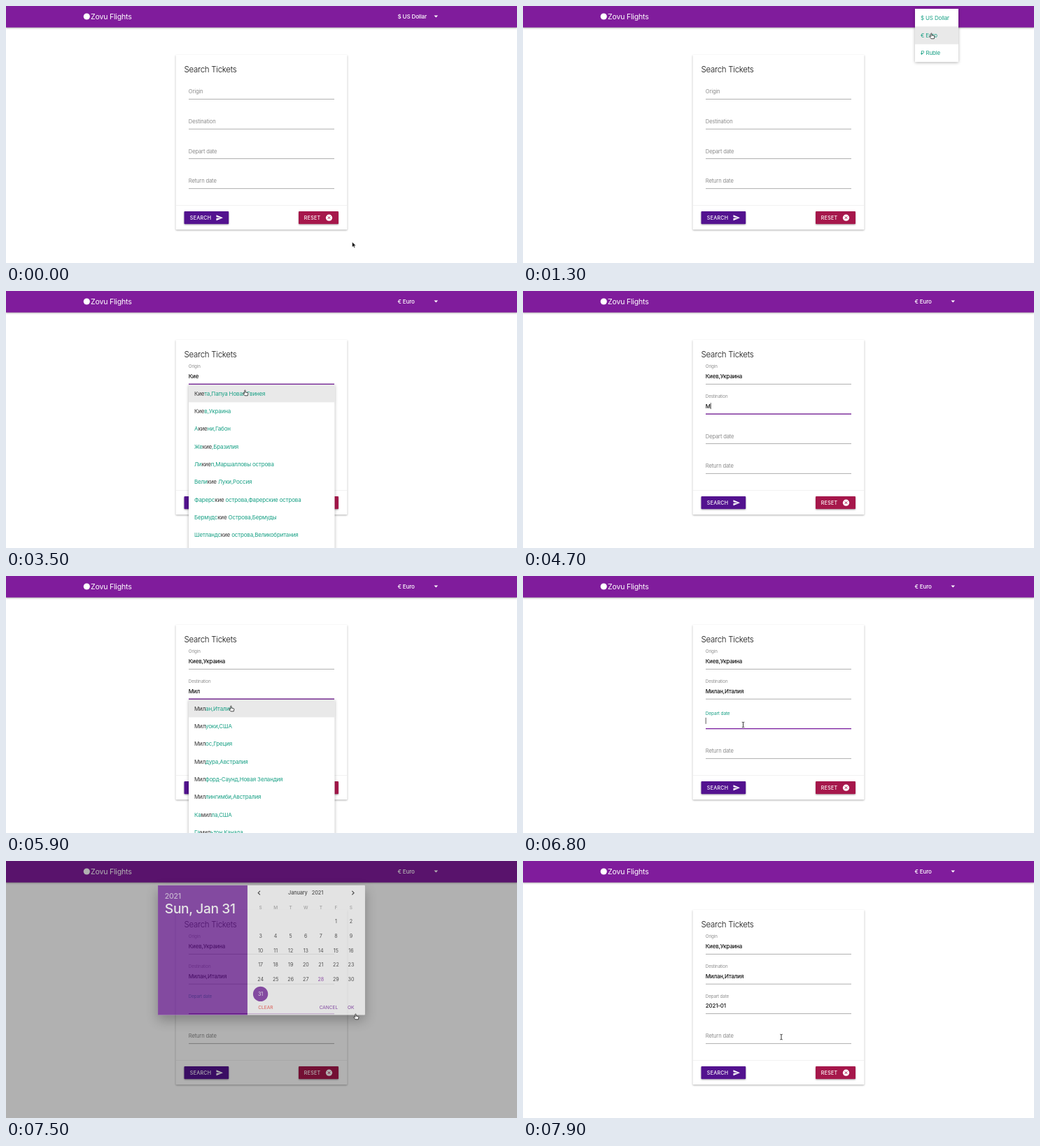
These frames come from a looping animation (730x368 px, 8000 ms). An HTML page:

```html
<!DOCTYPE html>
<html lang="en">
<head>
<meta charset="utf-8">
<title>Ticket search</title>
<style>
html, body { margin: 0; width: 100%; height: 100%; overflow: hidden; background: #fff; }
svg { display: block; width: 100%; height: 100%; }
text { font-family: Inter, "Open Sans", sans-serif; letter-spacing: -.02em; white-space: pre; }
.btn { letter-spacing: .25px; }
.flat { letter-spacing: 0; }
.mid { text-anchor: middle; letter-spacing: 0; }
.title { font-weight: 300; letter-spacing: -.025em; }
.med { font-weight: 500; }
.card { filter: drop-shadow(0 1px 1px rgba(0,0,0,.32)); }
.drop { filter: drop-shadow(0 1px 2px rgba(0,0,0,.3)); }
.deep { filter: drop-shadow(0 8px 9px rgba(0,0,0,.4)); }
</style>
</head>
<body>
<svg id="stage" viewBox="0 0 730 368" xmlns="http://www.w3.org/2000/svg"></svg>
<script>
const LOOP = 8000, STEP = 100, ROW = 25.35;
const PURPLE = '#7a1d9e', PANEL = '#6d1799', TEAL = '#18a085';
const stage = document.getElementById('stage');
const $ = id => document.getElementById(id);

const rect = (x, y, w, h, fill, extra = '') =>
  `<rect x="${x}" y="${y}" width="${w}" height="${h}" fill="${fill}" ${extra}/>`;
const text = (x, cy, size, str, fill, extra = '') =>
  `<text x="${x}" y="${cy + size * .36}" font-size="${size}" fill="${fill}" ${extra}>${str}</text>`;

// Form fields: centre of the label and position of the underline
const fields = [
  { name: 'Origin', cy: 122.4, line: 133.4 },
  { name: 'Destination', cy: 165.1, line: 176.2 },
  { name: 'Depart date', cy: 207.8, line: 218.6 },
  { name: 'Return date', cy: 250.4, line: 261.4 }
];

const lists = {
  money: { x: 560, y: 4, w: 62, find: '', items: ['$ US Dollar', '€ Euro', '₽ Ruble'] },
  from: { x: 261, y: 134, w: 208.5, find: 'кие', items: [
    'Киета,Папуа Новая Гвинея', 'Киев,Украина', 'Акиени,Габон', 'Жекие,Бразилия',
    'Ликиеп,Маршалловы острова', 'Великие Луки,Россия',
    'Фарерские острова,Фарерские острова', 'Бермудские Острова,Бермуды',
    'Шетландские острова,Великобритания', 'Нормандские острова,Великобритания'] },
  to: { x: 261, y: 177, w: 208.5, find: 'мил', items: [
    'Милан,Италия', 'Милуоки,США', 'Милос,Греция', 'Милдура,Австралия',
    'Милфорд-Саунд,Новая Зеландия', 'Миллингимби,Австралия', 'Камилла,США', 'Гамильтон,Канада'] }
};

function mark(str, find) {
  const i = find ? str.toLowerCase().indexOf(find) : -1;
  if (i < 0) return str;
  const end = i + find.length;
  return `${str.slice(0, i)}<tspan fill="#333">${str.slice(i, end)}</tspan>${str.slice(end)}`;
}

function listMarkup(id) {
  const { w, items, find } = lists[id];
  return `<g id="${id}" class="drop">${rect(0, 0, w, items.length * ROW, '#fff')}
    ${rect(0, 0, w, ROW, '#e9e9e9', `id="${id}Hover"`)}
    ${items.map((s, i) => text(8, (i + .5) * ROW, 8, mark(s, find), TEAL)).join('')}</g>`;
}

function fieldMarkup({ name, cy, line }, i) {
  return `<path d="M261 ${line}H469" stroke="#9a9a9a" stroke-width=".8"/>
    <path id="focus${i}" d="M261 ${line}H469" stroke="${PURPLE}" stroke-width="1.3"/>
    <text id="label${i}" font-size="7.6">${name}</text>
    ${text(260.8, cy - .4, 7.9, '', '#111', `id="value${i}" class="med"`)}`;
}

function calendarMarkup() {
  const col = i => 363.5 + i * 23.1;
  let out = [...'SMTWTFS'].map((d, i) => text(col(i), 69.4, 7, d, '#999', 'class="mid med"')).join('');
  out += `<circle id="picked" cx="363.5" cy="202.2" r="11.4" fill="${PANEL}"/>`;
  for (let d = 1; d <= 31; d++) {
    const cell = d + 4;
    out += text(col(cell % 7), 91.2 + Math.floor(cell / 7) * 22.2, 7.6, d,
      d === 28 ? PURPLE : '#222', `class="mid" id="day${d}"`);
  }
  return out;
}

stage.innerHTML = `
  ${rect(0, 0, 730, 368, '#fff')}
  <g class="card">${rect(0, 0, 730, 30.7, '#801c9c')}</g>
  <circle cx="115.3" cy="15" r="4.6" fill="#fff"/>
  ${text(121, 15, 10.6, 'Zovu Flights', '#fff')}
  ${text(559.5, 15, 8.1, '', '#fff', 'id="currency" class="med"')}
  <path d="M611.5 13.6h5.6l-2.8 2.9z" fill="#fff"/>

  <g class="card">${rect(242.5, 70, 245, 250.3, '#fff', 'rx="1"')}</g>
  ${text(254.5, 91.2, 11.5, 'Search Tickets', '#111', 'class="title"')}
  ${fields.map(fieldMarkup).join('')}
  <path id="caret" stroke="#333" stroke-width=".8"/>
  <path d="M242.5 285.5H487.5" stroke="#ededed" stroke-width=".7"/>
  <g class="card">${rect(254.5, 294, 63.7, 18.3, '#53128f', 'rx="1"')}
    ${rect(418, 294, 57, 18.3, '#a6174b', 'rx="1"')}</g>
  ${text(262.8, 303.2, 7.1, 'SEARCH', '#fff', 'class="btn med"')}
  <path transform="translate(299.6 297.8) scale(.45)" d="M2 21l21-9L2 3v7l15 2-15 2z" fill="#fff"/>
  ${text(425.8, 303.2, 7.1, 'RESET', '#fff', 'class="btn med"')}
  <circle cx="461.5" cy="303.2" r="4.6" fill="#fff"/>
  <path d="M459.8 301.5l3.4 3.4m0-3.4l-3.4 3.4" stroke="#a6174b"/>

  ${Object.keys(lists).map(listMarkup).join('')}

  ${rect(0, 0, 730, 368, '#000', 'id="shade"')}
  <g id="modal">
    <g class="deep">${rect(206.5, 35.5, 317, 199, '#fcfcfc', 'rx="1"')}</g>
    ${rect(206.5, 35.5, 137, 199, PANEL)}
    ${text(217, 52.4, 11.2, '2021', '#d5bce2', 'class="med"')}
    ${text(217, 71, 20.6, '', '#fff', 'id="heading" class="med"')}
    <path d="M362.8 44.2l-2.9 2.9 2.9 2.9M503.6 44.2l2.9 2.9-2.9 2.9" fill="none" stroke="#111" stroke-width="1.2"/>
    ${text(405.8, 47.2, 7.9, 'January', '#222', 'class="med"')}
    ${text(442, 47.2, 7.9, '2021', '#222', 'class="med"')}
    ${calendarMarkup()}
    ${text(359.8, 222.8, 7.1, 'CLEAR', '#f0392e', 'class="flat"')}
    ${text(453.6, 222.8, 7, 'CANCEL', PANEL, 'class="flat"')}
    ${text(496.8, 222.8, 7, 'OK', PANEL, 'class="flat"')}
  </g>

  <g id="pointer">
    <path id="arrow" d="M0 0V7.2L1.7 5.7 2.8 8.2 4 7.7 2.9 5.2H5.2z" fill="#000" stroke="#fff" stroke-width=".5"/>
    <path id="hand" d="M-1.2-3.6q.7-.8 1.3 0V-1l2.9.6q1 .3.9 1.3L3.3 3.8H-.9L-3.4.8q0-1 1-.7l1.2.8z" fill="#fff" stroke="#222" stroke-width=".8"/>
    <path id="beam" d="M-1.7-3.8Q0-3.8 0-2.8Q0-3.8 1.7-3.8M0-2.8V2.8M-1.7 3.8Q0 3.8 0 2.8Q0 3.8 1.7 3.8" fill="none" stroke="#222" stroke-width=".9"/>
  </g>`;

// time, x, y, shape; the shape holds until the next key
const path = [
  [0, 494.6, 338, 'arrow'], [200, 494.6, 338, 'arrow'], [300, 545, 165, 'arrow'],
  [400, 592, 17, 'hand'], [800, 592, 17, 'hand'], [1300, 584, 43, 'hand'],
  [1600, 584, 43, 'hand'], [1700, 570, 50, 'arrow'], [2100, 338, 122, 'beam'],
  [2500, 338, 122, ''], [3300, 338, 122, 'beam'], [3400, 341, 137, 'hand'],
  [3500, 342, 146, 'hand'], [3700, 318, 172, 'hand'], [3900, 318, 172, 'arrow'],
  [4200, 328, 166, 'beam'], [4600, 328, 166, ''], [5500, 328, 166, 'beam'],
  [5600, 327, 180, 'hand'], [5800, 322, 190, 'hand'], [6100, 322, 190, 'arrow'],
  [6500, 314.5, 213, 'beam'], [6900, 314.5, 213, 'arrow'], [7100, 364, 202, 'hand'],
  [7200, 364, 202, 'hand'], [7400, 500, 223, 'hand'], [7500, 500, 223, 'hand'],
  [7600, 475, 230, 'arrow'], [7800, 390, 250, 'beam'], [7900, 369, 252, 'beam'], [8000, 369, 252, 'beam']
];

const ramp = (t, a, b) => Math.min(1, Math.max(0, (t - a) / (b - a)));
const within = (t, a, b) => t >= a && t < b;
const show = (id, on) => $(id).setAttribute('visibility', on ? 'visible' : 'hidden');

// Last entry of [time, value, time, value...] already reached
function latest(t, ...steps) {
  let out = '';
  for (let i = 0; i < steps.length; i += 2) if (t >= steps[i]) out = steps[i + 1];
  return out;
}

function movePointer(t) {
  const i = path.findIndex(k => k[0] > t), a = path[i - 1], b = path[i];
  const p = ramp(t, a[0], b[0]);
  const x = a[1] + (b[1] - a[1]) * p, y = a[2] + (b[2] - a[2]) * p;
  $('pointer').setAttribute('transform', `translate(${x} ${y})`);
  for (const kind of ['arrow', 'hand', 'beam']) show(kind, kind === a[3]);
  return { y, shape: a[3] };
}

function setList(id, open, pointer) {
  const { x, y, items } = lists[id], s = .3 + .7 * open;
  const g = $(id), row = Math.floor((pointer.y - y) / ROW);
  g.setAttribute('transform', `translate(${x} ${y}) scale(${s})`);
  g.setAttribute('opacity', open);
  g.setAttribute('display', open ? 'inline' : 'none');
  const over = pointer.shape === 'hand' && row >= 0 && row < items.length;
  $(id + 'Hover').setAttribute('y', Math.max(0, row) * ROW);
  $(id + 'Hover').setAttribute('opacity', over ? 1 : 0);
}

function setField(i, value, lift, focused, color = '#8c8c8c') {
  const { cy } = fields[i], label = $('label' + i);
  const y = cy + 2.8 - 14.8 * lift;
  label.setAttribute('transform', `translate(260.8 ${y}) scale(${1 - .18 * lift})`);
  label.setAttribute('fill', color);
  $('value' + i).textContent = value;
  $('focus' + i).setAttribute('opacity', focused ? 1 : 0);
}

function setCaret(i) {
  show('caret', i >= 0);
  if (i < 0) return;
  const x = 261.2 + $('value' + i).getComputedTextLength(), y = fields[i].cy;
  $('caret').setAttribute('d', `M${x} ${y - 5}v9`);
}

function draw(ms) {
  const t = Math.floor(ms / STEP) * STEP;
  const pointer = movePointer(t);

  $('currency').textContent = t < 1600 ? '$ US Dollar' : '€ Euro';
  setList('money', ramp(t, 500, 800) - ramp(t, 1500, 1800), pointer);
  setList('from', ramp(t, 3100, 3400) - ramp(t, 3700, 4000), pointer);
  setList('to', ramp(t, 5200, 5500) - ramp(t, 5900, 6200), pointer);

  setField(0, latest(t, 2600, 'К', 3000, 'Ки', 3100, 'Кие', 3800, 'Киев,Украина'),
    ramp(t, 2000, 2300), within(t, 2100, 3900));
  setField(1, latest(t, 4700, 'М', 5100, 'Ми', 5200, 'Мил', 6000, 'Милан,Италия'),
    ramp(t, 4200, 4500), within(t, 4300, 6100));
  setField(2, latest(t, 7600, '2021-01'), ramp(t, 6600, 6850), within(t, 6700, 7600),
    within(t, 6700, 7600) ? TEAL : undefined);
  setField(3, '', 0, false);
  setCaret(within(t, 2200, 3200) ? 0 : within(t, 4400, 5300) ? 1 : within(t, 6700, 7000) ? 2 : -1);

  const open = ramp(t, 6800, 7100) - ramp(t, 7400, 7700), chosen = t >= 7200;
  const s = .8 + .2 * open;
  $('shade').setAttribute('opacity', .46 * open);
  $('modal').setAttribute('opacity', open);
  $('modal').setAttribute('display', open ? 'inline' : 'none');
  $('modal').setAttribute('transform',
    `translate(365 ${135 - 22 * (1 - open)}) scale(${s}) translate(-365 -135)`);
  $('heading').textContent = chosen ? 'Sun, Jan 31' : 'Thu, Jan 28';
  $('picked').setAttribute('opacity', chosen ? 1 : 0);
  $('day31').setAttribute('fill', chosen ? '#fff' : '#222');
}

const start = performance.now();
function tick(now) {
  draw(Math.max(0, now - start) % LOOP);
  requestAnimationFrame(tick);
}
draw(0);
requestAnimationFrame(tick);
</script>
</body>
</html>
```
